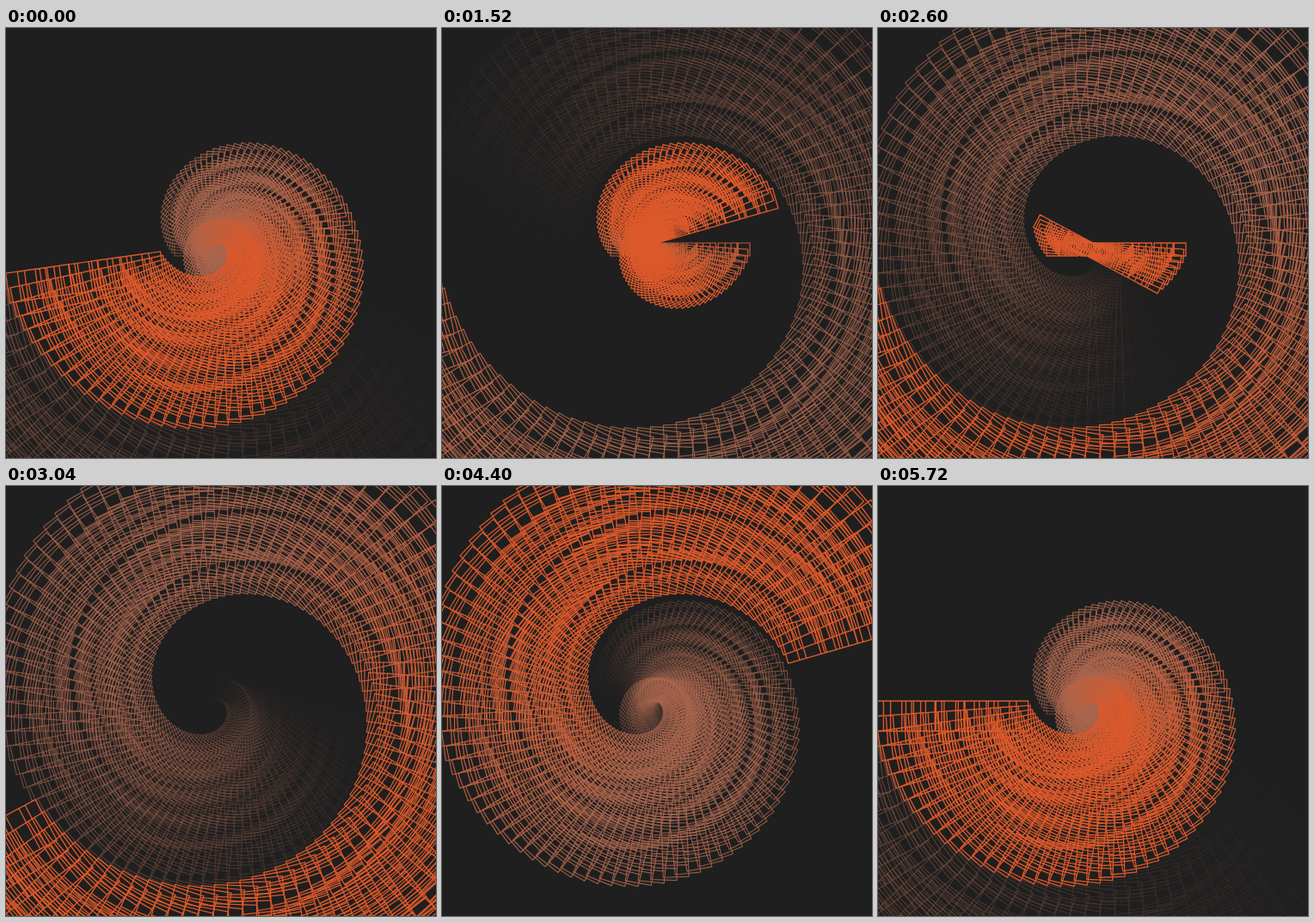
These frames come from a looping animation (500x500 px, 5.76 s). An HTML page with a canvas:

```html
<!DOCTYPE html>
<html lang="en">
<head>
<meta charset="utf-8">
<title>Spiral of squares</title>
<style>
  html, body { margin: 0; width: 100%; height: 100%; overflow: hidden; background: #1f1f1f; }
  canvas { display: block; width: 500px; height: 500px; }
</style>
</head>
<body>
<canvas id="stage" width="500" height="500"></canvas>
<script>
const ctx = document.getElementById('stage').getContext('2d');
const LOOP = 5760, FRAME = 40;
const COUNT = 180, STEP = Math.PI / 45;   // arms, 4 degrees apart
const START = 88, FADE = 127;             // head arm at time 0, visible arms
const ORANGE = [220, 89, 43], BROWN = [170, 102, 78], DARK = [104, 72, 61];

// Unevenly spaced squares along each arm.
const offsets = Array.from({ length: 13 }, (_, j) => 12.25 * j + 3 * Math.sin(j * Math.PI * 5 / 6));

const mod = (a, n) => ((a % n) + n) % n;
const ramp = (v, from, to) => Math.max(0, Math.min(1, (v - from) / (to - from)));
const blend = (a, b, mix) => a.map((c, i) => c + (b[i] - c) * mix);

function color(age) {
  const young = blend(ORANGE, BROWN, ramp(age, 30, 56));
  return `rgb(${blend(young, DARK, ramp(age, 84, 122)).map(Math.round).join()})`;
}

function drawArm(k, age) {
  const side = 15 + 0.222 * k;
  const inner = -108 + 2.037 * k;
  const life = age / FADE;
  ctx.setTransform(1, 0, 0, 1, 250, 250);
  ctx.rotate(k * STEP - Math.PI);
  ctx.globalAlpha = 1 - life ** 2.8;
  ctx.lineWidth = 1.35 - 0.4 * life;
  ctx.strokeStyle = color(age);
  ctx.beginPath();
  for (const offset of offsets) ctx.rect(inner + offset, -side, side, side);
  ctx.stroke();
}

function render(time) {
  const t = Math.floor((time + 2) / FRAME) * FRAME % LOOP;
  const head = START - t / LOOP * COUNT;
  ctx.setTransform(1, 0, 0, 1, 0, 0);
  ctx.globalAlpha = 1;
  ctx.fillStyle = '#1f1f1f';
  ctx.fillRect(0, 0, 500, 500);
  for (let k = 0; k < COUNT; k++) {
    const age = mod(head + 0.99 - k, COUNT);
    if (age < FADE) drawArm(k, age);
  }
}

const begin = performance.now();
function tick() {
  render(performance.now() - begin);
  requestAnimationFrame(tick);
}
tick();
</script>
</body>
</html>
```
